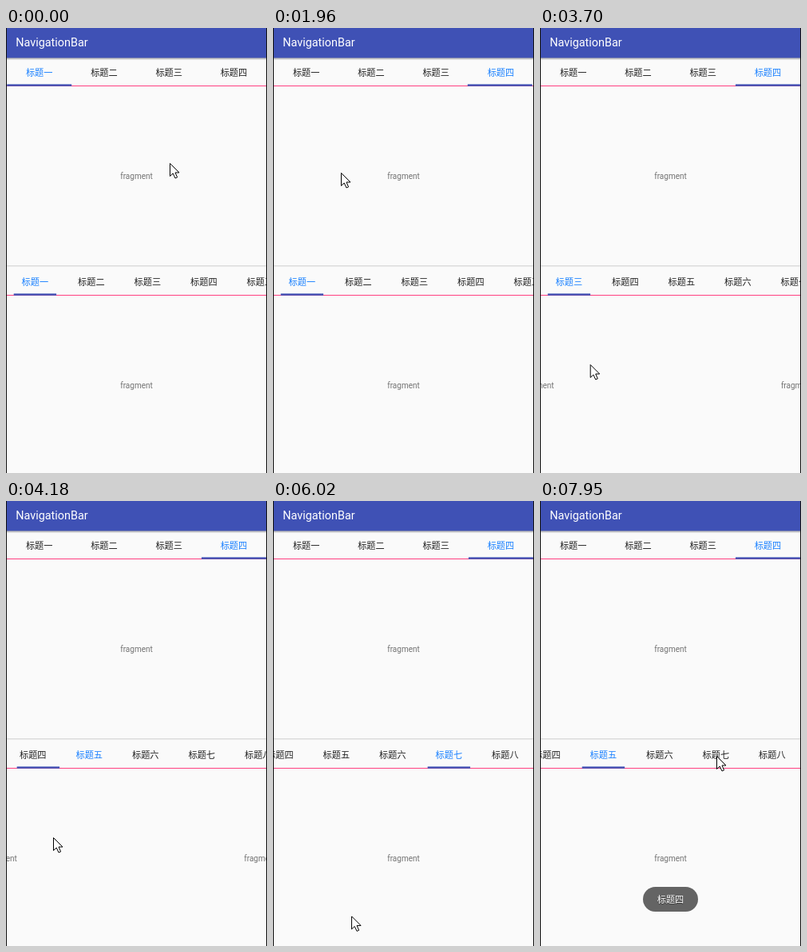
Write an HTML page that moves like this. It is 327 px wide and 557 px high and loops after 8000 ms.

```html
<!DOCTYPE html>
<html lang="zh-CN">
<head>
<meta charset="utf-8">
<title>NavigationBar</title>
<style>
  html, body { margin: 0; width: 100%; height: 100%; overflow: hidden; background: #fafafa; }
  svg { display: block; width: 327px; height: 557px; }
  .title { font: 400 14.4px Roboto, sans-serif; fill: #fff; }
  .tab, .toast text { font: 11.2px "Noto Sans CJK SC", "Noto Sans CJK", sans-serif; text-anchor: middle; }
  .tab { fill: #212121; }
  .tab.on { fill: #1a80ff; }
  .page { font: 10px Roboto, sans-serif; fill: #737373; text-anchor: middle; }
  .toast text { fill: #fff; text-shadow: 0 1px 1px #0008; }
</style>
</head>
<body>
<svg viewBox="0 0 327 557">
  <defs>
    <linearGradient id="shade" x2="0" y2="1">
      <stop stop-color="#000" stop-opacity=".35"/>
      <stop offset="1" stop-color="#000" stop-opacity="0"/>
    </linearGradient>
  </defs>
  <rect width="327" height="557" fill="#fafafa"/>
  <g id="pagers"></g>
  <rect y="297" width="327" height="1.5" fill="#dcdcdc"/>
  <rect y="37" width="327" height="3.5" fill="url(#shade)"/>
  <rect width="327" height="37.4" fill="#3f51b5"/>
  <text class="title" x="12.2" y="23">NavigationBar</text>
  <g class="toast" id="toast">
    <rect x="129" y="483" width="69" height="31" rx="15.5" fill="#646464"/>
    <text x="163.5" y="503">标题四</text>
  </g>
  <path d="M.5 0V557M326.5 0V557" stroke="#111"/>
  <path id="cursor" d="M.5.5V16.5L4.2 13L7 19L9.6 17.9L7 12H12Z" fill="#fff" stroke="#000" stroke-linejoin="round"/>
</svg>
<script>
const LOOP = 8000, PAGE = 325, DRAG_MS = 160, SETTLE_MS = 200, STRIP_MS = 250, REST_MS = 60;
const ramp = (t, start, ms) => Math.min(1, Math.max(0, (t - start) / ms));
const smooth = v => v * v * (3 - 2 * v);
const sine = v => (1 - Math.cos(Math.PI * v)) / 2;
const out = (v, power) => 1 - (1 - v) ** power;

// A steady rhythm of swipes; neighbouring swipes share a grip: release point and dragged share.
const swipes = ({ count, first, every, lag, grips }) =>
  Array.from({ length: count }, (_, i) => {
    const release = first + every * i;
    const grip = grips[(i >> 1) % grips.length];
    return { ...grip, release, settle: release + lag, ms: SETTLE_MS, step: 1, power: 3 };
  });
const tap = (release, step, ms) => ({ release, settle: release, drag: 0, ms, step, power: 5 });

const topSwipes = swipes({
  count: 3, first: 440, every: 645, lag: 20, grips: [{ x: 85, y: 181, drag: .37 }]
});
const bottomSwipes = swipes({
  count: 6, first: 2881, every: 417, lag: 105,
  grips: [{ x: 69, y: 439, drag: .3 }, { x: 59, y: 421, drag: .523 }, { x: 117, y: 423, drag: .382 }]
});
const taps = [tap(6420, -3, 1000), tap(7620, 1, 400)];

function add(parent, name, attrs, text = "") {
  const el = document.createElementNS("http://www.w3.org/2000/svg", name);
  for (const key in attrs) el.setAttribute(key, attrs[key]);
  el.textContent = text;
  return parent.appendChild(el);
}

function makePager({ y, labels, first, pitch, barX, barWidth, maxScroll, moves }) {
  const root = add(document.getElementById("pagers"), "g", { transform: `translate(0 ${y})` });
  add(root, "rect", { y: 72, width: 327, height: 1, fill: "#ff4081" });
  const strip = add(root, "g", {});
  const tabs = [...labels].map((label, i) =>
    add(strip, "text", { class: "tab", x: first + pitch * i, y: 59.8 }, "标题" + label));
  const bar = add(root, "rect", { y: 70.4, width: barWidth, height: 2.4, fill: "#3f51b5" });
  const pages = [0, 1].map(() => add(root, "text", { class: "page", y: 188.5 }, "fragment"));
  const scrollFor = i => Math.min(pitch * i, maxScroll);

  return t => {
    let selected = 0, position = 0, marker = 0, scroll = 0;
    for (const m of moves) {
      const dragged = m.drag * smooth(ramp(t, m.release - DRAG_MS, DRAG_MS));
      const settled = (1 - m.drag) * out(ramp(t, m.settle, m.ms), m.power);
      position += m.step * (dragged + settled);
      if (t < m.release) continue;
      const k = sine(ramp(t, m.release, STRIP_MS));
      const next = selected + m.step;
      marker += m.step * k;
      scroll += (scrollFor(next) - scrollFor(selected)) * k;
      selected = next;
    }
    strip.setAttribute("transform", `translate(${-scroll} 0)`);
    bar.setAttribute("x", barX + pitch * marker - scroll);
    tabs.forEach((tab, i) => tab.classList.toggle("on", i === selected));
    const shift = position - Math.floor(position);
    pages.forEach((page, i) => page.setAttribute("x", 163.5 + PAGE * (i - shift)));
  };
}

const pagers = [
  makePager({
    y: 0, labels: "一二三四", first: 41.7, pitch: 81.25, barX: 1.2, barWidth: 81,
    maxScroll: 0, moves: topSwipes
  }),
  makePager({
    y: 262, labels: "一二三四五六七八", first: 36.3, pitch: 70.5, barX: 9.7, barWidth: 53.4,
    maxScroll: 239, moves: [...bottomSwipes, ...taps]
  })
];

// Pointer stops: time, x, y of the tip
const grab = ({ release, x, y, drag }) =>
  [[release - DRAG_MS, x + PAGE * drag, y], [release, x, y], [release + REST_MS, x, y]];
const trail = [
  [0, 205, 169],
  ...topSwipes.flatMap(grab), [1960, 85, 181],
  ...bottomSwipes.flatMap(grab), [5600, 117, 423],
  [6150, 95, 535], [6400, 22, 323], [6920, 22, 323],
  [7400, 100, 322], [7620, 100, 322], [7940, 221, 319], [LOOP, 221, 319]
];
const cursor = document.getElementById("cursor");
const toast = document.getElementById("toast");

function moveCursor(t) {
  const i = trail.findIndex(stop => stop[0] > t);
  const [t0, x0, y0] = trail[i - 1], [t1, x1, y1] = trail[i];
  const k = smooth(ramp(t, t0, t1 - t0));
  cursor.setAttribute("transform", `translate(${x0 + (x1 - x0) * k} ${y0 + (y1 - y0) * k})`);
}

function draw() {
  const t = performance.now() % LOOP;
  pagers.forEach(update => update(t));
  toast.setAttribute("opacity", ramp(t, 6670, 400));
  moveCursor(t);
  requestAnimationFrame(draw);
}
draw();
</script>
</body>
</html>
```
